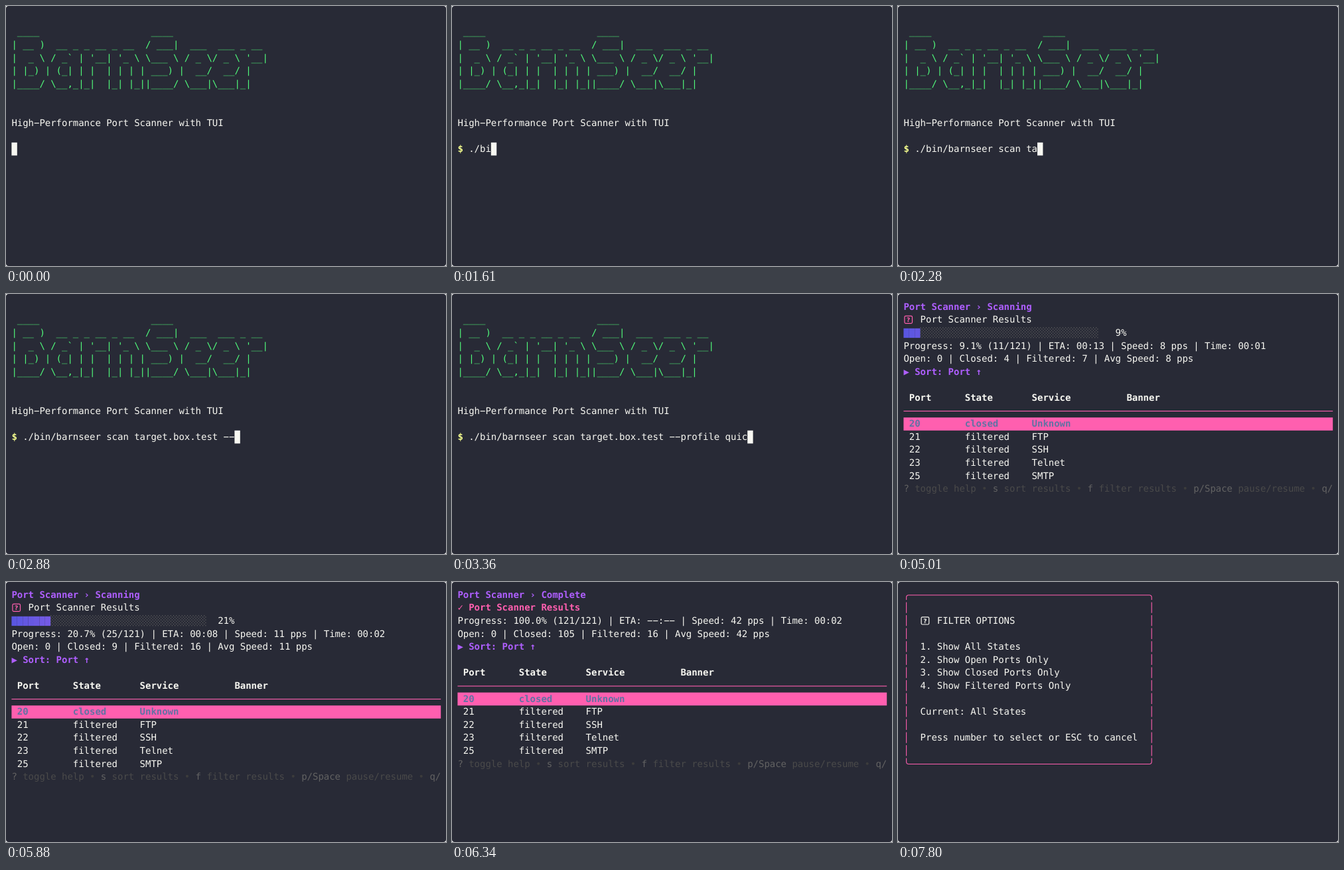
An HTML page with a canvas that plays this animation: 663x392 px, repeating every 8000 ms.

```html
<!DOCTYPE html>
<html lang="en">
<head>
<meta charset="utf-8">
<title>Terminal port scan</title>
<style>
  html, body { margin: 0; width: 100%; height: 100%; overflow: hidden; background: #fff; }
  canvas { display: block; width: 663px; height: 392px; border-radius: 4px; }
</style>
</head>
<body>
<canvas id="term"></canvas>
<script>
const W = 663, H = 392, LOOP = 8000;
const CELL = 8.4, LINE = 19.6, LEFT = 8.4, TOP = 9.8, COLS = 77;
const BG = '#282a36', FG = '#f8f8f2', GREEN = '#50fa7b', YELLOW = '#f1fa8c';
const PINK = '#ff5faf', PURPLE = '#af5fff', SLATE = '#6272a4';

const canvas = document.getElementById('term');
const ctx = canvas.getContext('2d');
const dpr = window.devicePixelRatio || 1;
canvas.width = Math.round(W * dpr);
canvas.height = Math.round(H * dpr);

const BANNER = [
  " ____                    ____",
  "| __ )  __ _ _ __ _ __  / ___|  ___  ___ _ __",
  "|  _ \\ / _` | '__| '_ \\ \\___ \\ / _ \\/ _ \\ '__|",
  "| |_) | (_| | |  | | | | ___) |  __/  __/ |",
  "|____/ \\__,_|_|  |_| |_||____/ \\___|\\___|_|"
];
const COMMAND = './bin/barnseer scan target.box.test --profile quick';
const RESULTS = [
  ['20', 'closed', 'Unknown'],
  ['21', 'filtered', 'FTP'],
  ['22', 'filtered', 'SSH'],
  ['23', 'filtered', 'Telnet'],
  ['25', 'filtered', 'SMTP']
];
const HELP = [
  ['?', 'toggle help'], ['s', 'sort results'], ['f', 'filter results'],
  ['p/Space', 'pause/resume'], ['q/', '']
];

const colX = col => LEFT + col * CELL;
const rowY = row => TOP + row * LINE;

// Every character sits in its own terminal cell.
function put(row, col, text, color = FG, bold = false) {
  ctx.font = (bold ? 'bold ' : '') + '14px "DejaVu Sans Mono", monospace';
  ctx.fillStyle = color;
  const y = rowY(row) + 14;
  [...text].forEach((ch, i) => {
    if (ch !== ' ') ctx.fillText(ch === '-' ? '\u2212' : ch, colX(col + i), y);
  });
}

function fillCells(row, col, count, color) {
  ctx.fillStyle = color;
  ctx.fillRect(colX(col), rowY(row), count * CELL, LINE);
}

function boxedMark(row, col, color) {
  const x = colX(col) + 7.3, y = rowY(row) + 9.4;
  ctx.strokeStyle = color;
  ctx.lineWidth = 1.2;
  ctx.beginPath();
  ctx.roundRect(x - 5.8, y - 5.6, 11.6, 11.2, 1.8);
  ctx.stroke();
  ctx.font = 'bold 9px "DejaVu Sans", sans-serif';
  ctx.fillStyle = color;
  ctx.textAlign = 'center';
  ctx.fillText('?', x, y + 3.3);
  ctx.textAlign = 'left';
}

function drawShell(t) {
  BANNER.forEach((line, i) => put(i + 1, 0, line, GREEN));
  put(8, 0, 'High-Performance Port Scanner with TUI');
  if (t < 1500) return fillCells(10, 0, 1, FG);
  const typed = Math.min(2 + Math.floor((t - 1500) / 38), COMMAND.length + 1);
  put(10, 0, '$', YELLOW, true);
  put(10, 2, COMMAND.slice(0, typed));
  if (typed > COMMAND.length) fillCells(11, 0, 1, FG);
  else fillCells(10, 2 + typed, 1, FG);
}

// Time of the latest screen refresh during the scan.
function refreshTime(t) {
  const snap = (from, step) => from + step * Math.floor((t - from) / step);
  if (t < 4340) return 4170;
  if (t < 5600) return Math.min(5450, snap(4340, 74));
  if (t < 5880) return snap(5600, 70);
  return t < 5970 ? 5880 : snap(5970, 92.5);
}

function scanStats(t) {
  const at = refreshTime(t);
  if (at < 4340) return { done: 0, closed: 0, speed: 0, eta: '--:--', time: 0 };
  const done = at <= 5880
    ? Math.round(25 * (at - 4270) / 1610)
    : Math.round(25 + 96 * (at - 5880) / 460);
  const secs = (at - 3650) / 1000;
  const rate = done / secs;
  return {
    done,
    closed: Math.max(Math.round(done * 0.36), done - 16),
    speed: Math.round(rate),
    eta: clock((121 - done) / rate),
    time: secs
  };
}

function clock(s) {
  const two = n => String(Math.floor(n)).padStart(2, '0');
  return two(s / 60) + ':' + two(s % 60);
}

function drawBar(row, share) {
  const full = Math.round(share * 35);
  for (let i = 0; i < 35; i++) {
    if (i >= full) { put(row, i, '░', '#606060'); continue; }
    const mix = (a, b) => Math.round(a + (b - a) * i / 34);
    ctx.fillStyle = `rgb(${mix(90, 238)},${mix(86, 111)},${mix(224, 248)})`;
    ctx.fillRect(colX(i), rowY(row) + 2.8, CELL, 14.3);
  }
  put(row, 36, String(Math.round(share * 100)).padStart(3) + '%');
}

function drawStats(row, s) {
  const pct = (s.done / 121 * 100).toFixed(1);
  put(row, 0, `Progress: ${pct}% (${s.done}/121) | ETA: ${s.eta} | Speed: ${s.speed} pps | Time: ${clock(s.time)}`);
  put(row + 1, 0, `Open: 0 | Closed: ${s.closed} | Filtered: ${s.done - s.closed} | Avg Speed: ${s.speed} pps`);
  put(row + 2, 0, '▶ Sort: Port ↑', PURPLE, true);
}

function drawTable(row, count) {
  const stops = [1, 11, 23, 40];
  ['Port', 'State', 'Service', 'Banner'].forEach((h, i) => put(row, stops[i], h, FG, true));
  ctx.fillStyle = PINK;
  ctx.fillRect(LEFT, rowY(row + 1) + 9.4, COLS * CELL, 1.1);
  RESULTS.slice(0, count).forEach((cells, r) => {
    const chosen = r === 0;
    if (chosen) fillCells(row + 2, 0, COLS, PINK);
    cells.forEach((c, i) => put(row + 2 + r, stops[i], c, chosen ? SLATE : FG, chosen));
  });
  let col = 0;
  HELP.forEach(([key, label], i) => {
    if (i) { put(row + 7, col + 1, '•', '#3c3c3c'); col += 3; }
    put(row + 7, col, key, '#626262');
    put(row + 7, col + key.length + 1, label, '#4a4a4a');
    col += key.length + 1 + label.length;
  });
}

function drawScan(t) {
  const s = scanStats(t);
  put(0, 0, 'Port Scanner › Scanning', PURPLE, true);
  boxedMark(1, 0, PINK);
  put(1, 3, 'Port Scanner Results');
  drawBar(2, s.done / 121);
  drawStats(3, s);
  drawTable(7, Math.min(5, s.done));
}

function drawComplete() {
  put(0, 0, 'Port Scanner › Complete', PURPLE, true);
  put(1, 0, '✓ Port Scanner Results', PINK, true);
  drawStats(2, { done: 121, closed: 105, speed: 42, eta: '--:--', time: 2 });
  drawTable(6, 5);
}

function drawFilter() {
  const l = colX(0.5), r = colX(44.5), top = rowY(0) + 9.9, bottom = rowY(13) + 9.9, k = 3.5;
  ctx.strokeStyle = PINK;
  ctx.lineWidth = 1.1;
  ctx.beginPath();
  for (const [y, end] of [[top, rowY(0) + 17.3], [bottom, rowY(13) + 1]]) {
    ctx.moveTo(l, end);
    ctx.arcTo(l, y, l + k, y, k);
    ctx.arcTo(r, y, r, end, k);
    ctx.lineTo(r, end);
  }
  for (let row = 1; row < 13; row++) {
    for (const x of [l, r]) {
      ctx.moveTo(x, rowY(row) + 1);
      ctx.lineTo(x, rowY(row) + 17.3);
    }
  }
  ctx.stroke();
  boxedMark(2, 3, FG);
  put(2, 6, 'FILTER OPTIONS');
  ['All States', 'Open Ports Only', 'Closed Ports Only', 'Filtered Ports Only']
    .forEach((name, i) => put(4 + i, 3, `${i + 1}. Show ${name}`));
  put(9, 3, 'Current: All States');
  put(11, 3, 'Press number to select or ESC to cancel');
}

function draw(t) {
  ctx.setTransform(dpr, 0, 0, dpr, 0, 0);
  ctx.textRendering = 'geometricPrecision';
  ctx.fillStyle = BG;
  ctx.fillRect(0, 0, W, H);
  if (t < 4170) drawShell(t);
  else if (t < 6340) drawScan(t);
  else if (t < 7800) drawComplete();
  else drawFilter();
}

const start = performance.now();
function tick() {
  draw((performance.now() - start) % LOOP);
  requestAnimationFrame(tick);
}
tick();
</script>
</body>
</html>
```
